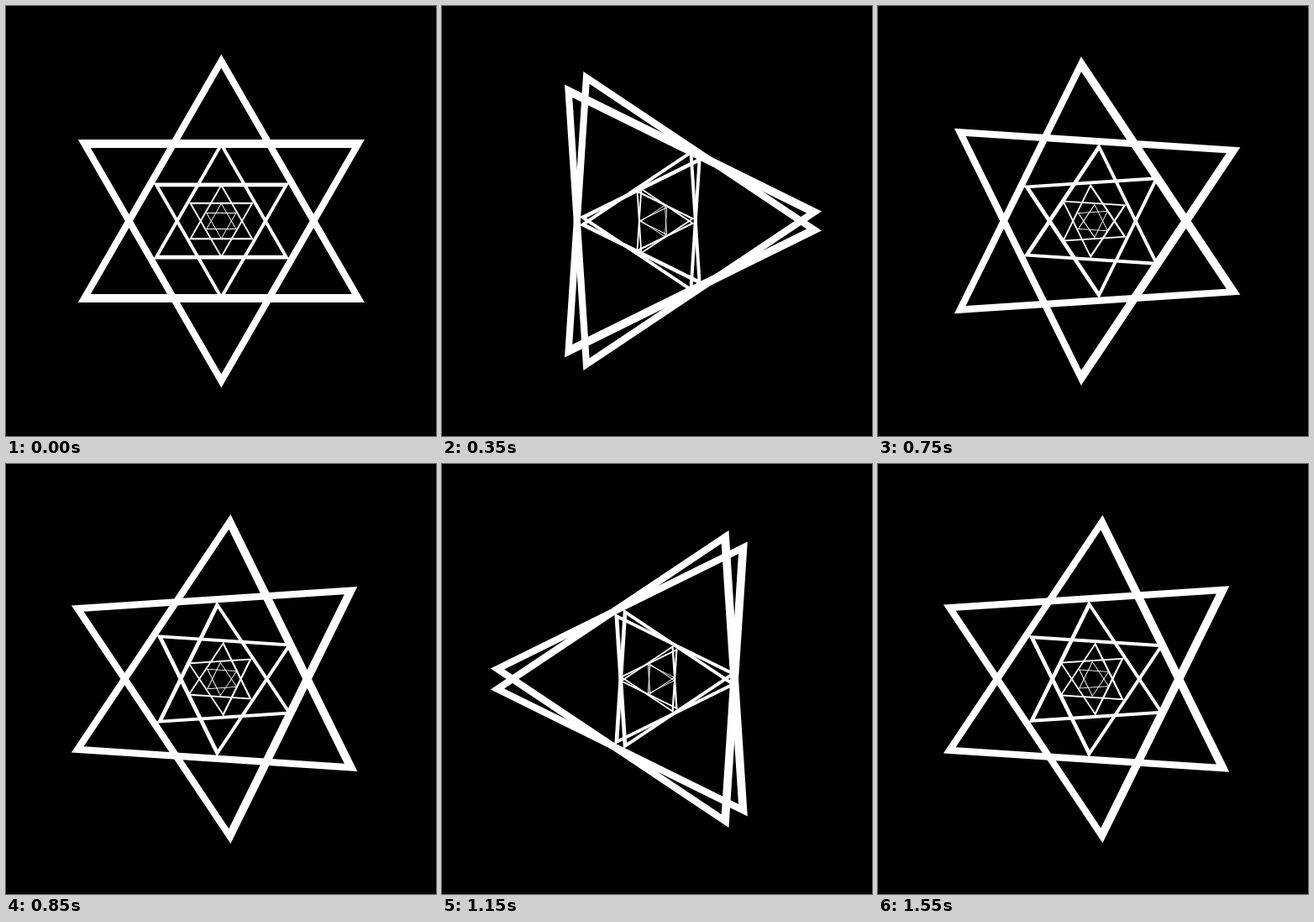
Write an HTML page with a canvas that moves like this. It is 512x512 px and loops after 1600 ms.

```html
<!DOCTYPE html>
<html lang="en">
<head>
<meta charset="utf-8">
<title>Nested triangles</title>
<style>
  html, body { margin: 0; width: 100%; height: 100%; overflow: hidden; background: #000; }
  canvas { display: block; }
</style>
</head>
<body>
<canvas id="stage" width="512" height="512"></canvas>
<script>
const ctx = document.getElementById('stage').getContext('2d');
const LOOP = 1600, STEPS = 32, TURN = Math.PI * 2 / 3;
const MID = 256, LEVELS = 4, SHRINK = 0.475;
const PIVOT = { x: 0.35, y: 0.4 };
const RADIUS = 197, LIFT = 2;   // outer size, centroid height above the pivot
const BASE = 9.8, SIDE = 8.2;   // bar widths: the base is a little heavier

function corners(radius, lift) {
  for (let i = 0; i < 3; i++) {
    const a = i * TURN, x = radius * Math.sin(a), y = -radius * Math.cos(a) - lift;
    if (i) ctx.lineTo(x, y); else ctx.moveTo(x, y);
  }
  ctx.closePath();
}

// Triangle with a triangular hole
function frame() {
  const inset = (BASE + 2 * SIDE) / 3;
  ctx.beginPath();
  corners(RADIUS, LIFT);
  corners(RADIUS - 2 * inset, LIFT + BASE - inset);
  ctx.fill('evenodd');
}

function nest(angle, flip) {
  ctx.save();
  ctx.translate(MID, MID);
  ctx.scale(1, flip);
  ctx.translate(PIVOT.x, PIVOT.y);
  ctx.rotate(angle);
  for (let i = 0; i < LEVELS; i++) {
    frame();
    ctx.scale(-SHRINK, -SHRINK);
  }
  ctx.restore();
}

function draw(time) {
  const step = Math.floor((time % LOOP) / LOOP * STEPS);
  const angle = -TURN * step / STEPS;
  ctx.fillStyle = '#000';
  ctx.fillRect(0, 0, 512, 512);
  ctx.fillStyle = '#fff';
  nest(angle, 1);
  nest(angle, -1);
}

const start = performance.now();
function tick() {
  draw(performance.now() - start);
  requestAnimationFrame(tick);
}
tick();
</script>
</body>
</html>
```
